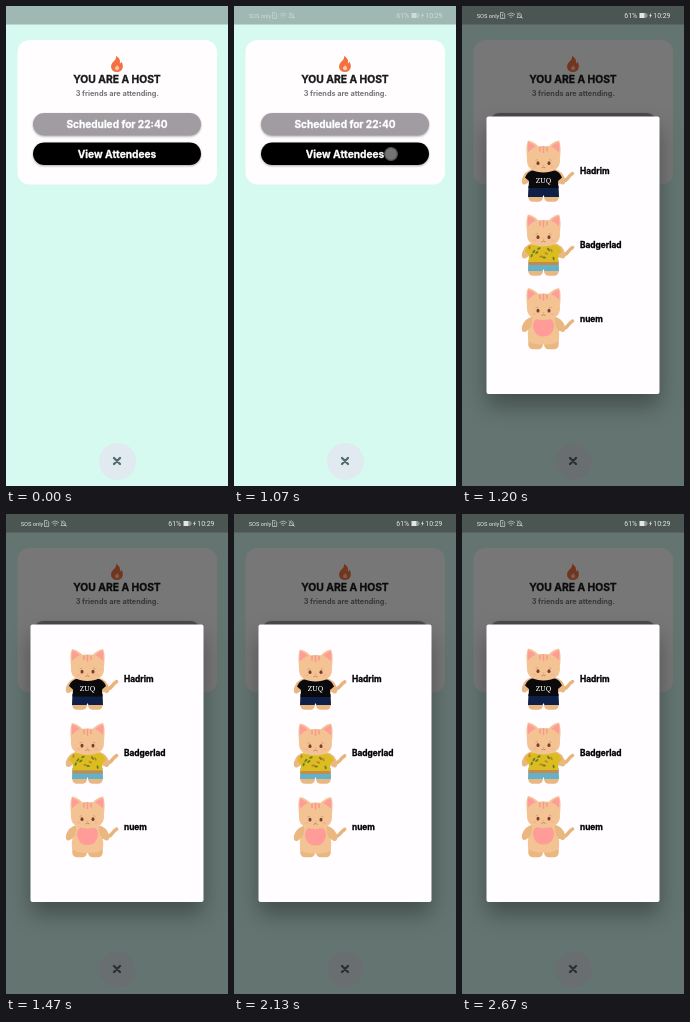
An HTML page for the animation above (3070 ms loop, 222 by 480 pixels).

```html
<!DOCTYPE html>
<html lang="en">
<head>
<meta charset="utf-8">
<title>Host attendees</title>
<style>
html, body { margin: 0; width: 100%; height: 100%; overflow: hidden; background: #d6faf0; }
svg { display: block; width: 222px; height: 480px; }
text { font-family: Inter, sans-serif; font-weight: 700; stroke-width: .3; stroke-linejoin: round; }
.dark { fill: #1b181b; stroke: #1b181b; }
.mute { fill: #777279; stroke: none; }
.light { fill: #fff; stroke: #fff; }
.mid { text-anchor: middle; }
.status text { font: 6.9px Roboto, sans-serif; fill: #fff; }
.name { font-size: 8.3px; fill: #000; stroke: #000; }
.logo { font: 7.5px "Noto Serif", serif; fill: #fff; text-anchor: middle; }
.fur { fill: #f4c393; }
.limb { fill: #eab780; }
.pink { fill: #ff9c98; }
.button { filter: drop-shadow(0 1px 1px #0005); }
.panel { filter: drop-shadow(0 12px 11px #0005); }
</style>
</head>
<body>
<svg viewBox="0 0 222 480">
  <rect width="222" height="480" fill="#d6faf0"/>
  <rect width="222" height="18.500" fill="#a0b8b2"/>
  <rect x="11.500" y="34" width="199.500" height="144.500" rx="12" fill="#fffdfe"/>
  <path d="M110 50C114 52 114.500 55 113.800 57.500Q115.300 57 115.200 55.500C118 59 117.700 66 111 66S103.500 59 107.500 55.500Q110.500 53 110 50Z" fill="#f4713f"/>
  <path d="M111 59Q113.800 61.500 113 63.300Q111 65 109.200 63.300Q108.500 62 109.500 60.800Q110.800 61 111 59Z" fill="#fbc4ad"/>
  <text class="dark mid" x="111" y="77.300" font-size="10.300">YOU ARE A HOST</text>
  <text class="mute mid" x="111.300" y="89.700" font-size="7.300">3 friends are attending.</text>
  <g class="button">
    <rect x="27" y="107" width="168" height="22.500" rx="11.250" fill="#a09ca2"/>
    <rect x="27" y="136.500" width="168" height="22.500" rx="11.250"/>
  </g>
  <text class="light mid" x="111" y="122" font-size="10.100">Scheduled for 22:40</text>
  <text class="light mid" x="111" y="151.500" font-size="10.200">View Attendees</text>
  <circle cx="111.500" cy="455.500" r="18.500" fill="#e0eaf0"/>
  <path d="M108 452l6 6m0-6l-6 6" stroke="#566a6c" stroke-width="2.300" stroke-linecap="round"/>
  <circle id="touch" cx="157" cy="148" r="6.300" fill="#929292" stroke="#686868" stroke-width="1.200"/>
  <rect id="dim" width="222" height="480"/>
  <g id="dialog">
    <rect class="panel" x="24.500" y="110.500" width="173" height="277.500" rx="2" fill="#fffdff"/>
  </g>
  <g id="status" class="status" fill="none" stroke="#fff" stroke-width=".6">
    <g stroke="none">
      <text x="14.700" y="11.500" style="font-size:5.700px">SOS only</text>
      <text x="162.300" y="12">61%</text>
      <text x="191.300" y="12">10:29</text>
      <path d="M177.500 7h5v5h-5zM189.300 6.500l-2.200 3.200h1.200l-.7 2.800 2.200-3.400h-1.200z" fill="#fff"/>
      <path d="M182.500 7h2v1.300h1v2.400h-1V12h-2z" fill="#fff" opacity=".45"/>
    </g>
    <path d="M38.500 6.500h2.700l1.500 1.500v4.500h-4.200zM40.600 8v2m0 .8v.8M45.500 8.500q3.700-3 7.400 0M46.800 10q2.400-2 4.800 0M48.300 11.500q.9-.7 1.800 0M55 11.500h5l-.7-1.200V8.500q-1.800-3-3.600 0v1.800zM55 6.500l5.500 6"/>
  </g>
</svg>
<script>
const $ = id => document.getElementById(id);
const LOOP = 3070, STEP = 200 / 3;
const clamp = v => Math.max(0, Math.min(1, v));
const mirrored = part => part + `<g transform="scale(-1 1)">${part}</g>`;

const shirt = (color, extra) =>
  `<path d="M-9 30Q-16 30.500 -18.500 37.500L-14.500 41L-15 48H15L14.500 41L18.500 37.500Q16 30.500 9 30Z" fill="${color}"/>${extra}`;
const shorts = color => `<path d="M-15 46H15L15.500 57H1L0 55L-1 57H-15.500Z" fill="${color}"/>`;
const spots = Array.from({length: 11}, (_, i) => {
  const x = -14 + (i * 7.3) % 27, y = 33.5 + (i * 5) % 12;
  return `<ellipse cx="${x}" cy="${y}" rx="1" ry="1.900" transform="rotate(${i * 50} ${x} ${y})" fill="${i % 3 ? '#6b7f22' : '#c0802a'}"/>`;
}).join('');

const friends = [
  {name: 'Hadrim', y: 134, legs: shorts('#0e1f48'),
    top: shirt('#0a090b', '<text class="logo" y="42.500">ZUQ</text>')},
  {name: 'Badgerlad', y: 208, legs: shorts('#62b3c9'),
    top: shirt('#dcbd21', spots + '<path d="M-15 48H15V51H-15Z" fill="#c58a4c"/>')},
  {name: 'nuem', y: 281.5, legs: '',
    top: '<path class="pink" d="M0 33C4 29 10.500 31 10.500 39Q9 49 0 49T-10.500 39C-10.500 31 -4 29 0 33Z"/>'}
];

const arm = '<path class="limb" d="M-11 29Q-19 31 -21.500 39Q-22.500 45 -18.500 44.500Q-14 42.500 -12 38Z"/>';
const leg = '<rect class="limb" x="-15.200" y="48" width="14.600" height="13.800" rx="4.500"/>';
const ear = `<path class="fur" d="M-16.500 18Q-18 5 -15.500 .5Q-8 2 -4 8Z"/>
  <path class="pink" d="M-15.500 12Q-16.300 5 -15 2Q-9.500 4 -7 8Z"/>`;
const face = mirrored(`<ellipse cx="-5.500" cy="23.200" rx="1.500" ry="1.900" fill="#78402c"/>
  <path d="M-8 20.500l2.500-1" stroke="#c08a60" stroke-width=".6"/>
  <ellipse class="pink" cx="-9" cy="26.500" rx="2.200" ry="1.100" opacity=".4"/>`) +
  `<path class="pink" d="M-1.200 24.500h2.400L0 26z"/>
  <path d="M-2 28q2-2 4 0" fill="none" stroke="#a8704c" stroke-width=".7"/>
  <path d="M-3.500 7.500v3.500M0 7v5.500M3.500 7.500v3.500" stroke="#f8988c" stroke-width="1.500" stroke-linecap="round"/>`;

const cat = ({name, y, legs, top}) => `<g transform="translate(81.500 ${y})">
  <path class="tail" d="M13 41.500Q21 42.500 24 38.500T29 33.500" fill="none" stroke="#e7b57c" stroke-width="3.500" stroke-linecap="round"/>
  ${mirrored(leg)}${legs}
  <g class="bob">
    ${legs ? '' : '<path class="fur" d="M-10 28Q-17 42 -15.500 52Q-14 57 0 57T15.500 52Q17 42 10 28Z"/>'}
    ${mirrored(arm)}${top}
    ${mirrored(ear)}
    <path class="fur" d="M-16.500 21C-17 9 -9 6 0 6S17 9 16.500 21C16.500 29 9 32.500 0 32.500S-16.500 29 -16.500 21Z"/>
    ${face}
  </g></g>
  <text class="name" x="118" y="${y + 34}">${name}</text>`;

$('dialog').innerHTML += friends.map(cat).join('');
const bobs = document.querySelectorAll('.bob');
const tails = document.querySelectorAll('.tail');

function draw() {
  const t = Math.floor((performance.now() % LOOP + 3.5) / STEP) * STEP;
  const open = clamp((t - 1067) / 120);
  $('touch').style.opacity = t > 1260 ? 0 : .8 * clamp((t - 735) / 195);
  $('dim').style.opacity = t < 1100 ? 0 : .24 + .29 * open;
  $('dialog').style.opacity = open;
  $('status').style.opacity = t < 1100 ? .5 * clamp((t - 330) / 130) : .85;

  const breath = (1 - Math.cos(2 * Math.PI * clamp((t - 1200) / 1330))) / 2;
  bobs.forEach(g => g.setAttribute('transform', `translate(0 ${1.5 * breath})`));
  tails.forEach(g => g.setAttribute('transform', `rotate(${2 * breath} 13 42)`));
  requestAnimationFrame(draw);
}
draw();
</script>
</body>
</html>
```
